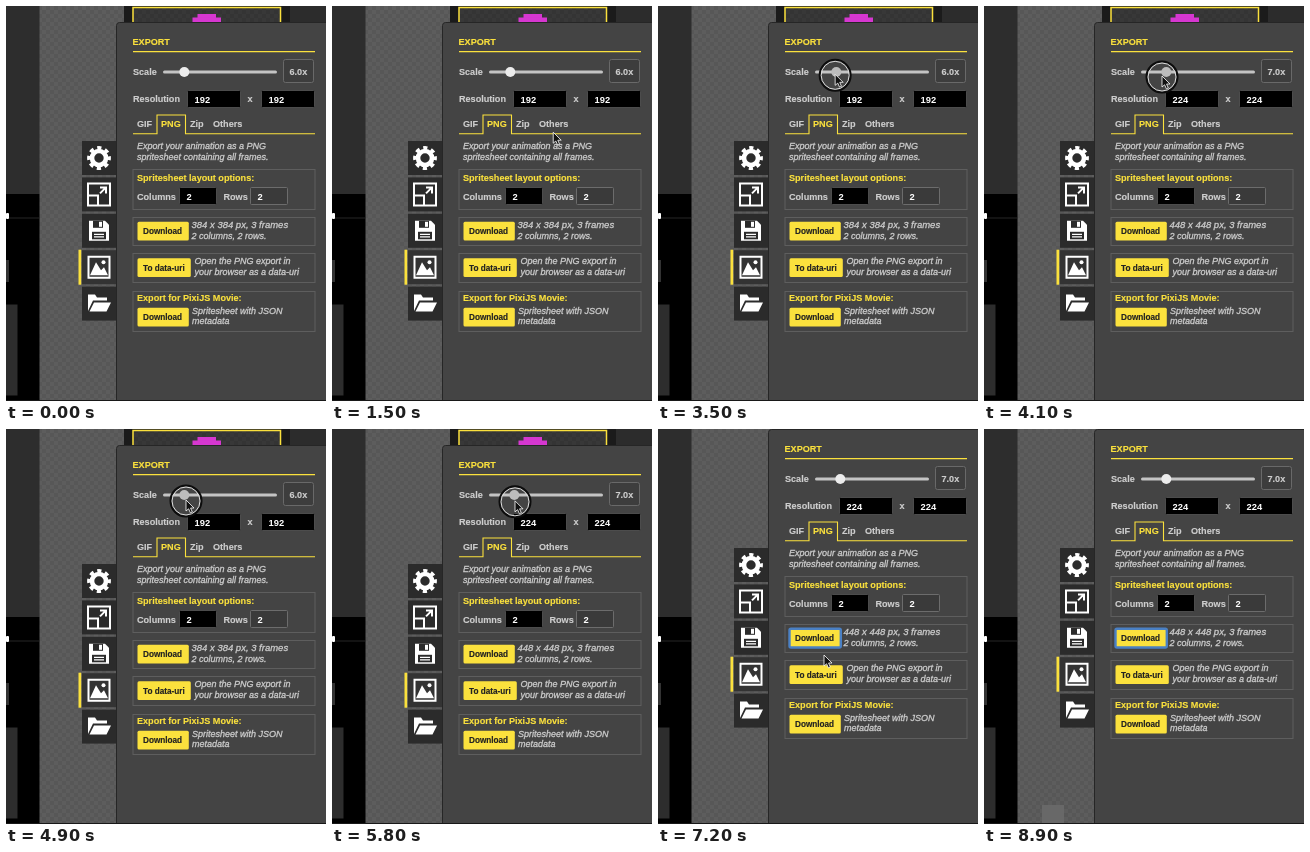
These frames come from a looping animation (320x395 px, 9400 ms). An HTML page:

```html
<!DOCTYPE html>
<html lang="en">
<head>
<meta charset="utf-8">
<title>Export panel</title>
<style>
  html, body { margin: 0; width: 100%; height: 100%; overflow: hidden; background: #444; }
  svg { display: block; width: 100vw; height: 100vh; }
  text {
    font: bold 9.1px "Liberation Sans", Arial, sans-serif; white-space: pre;
    fill: #cecece; stroke: #cecece; stroke-width: .15px;
  }
  .title { fill: #fbe13d; stroke: #fbe13d; }
  .note { font-weight: normal; font-style: italic; font-size: 9px; stroke-width: .3px; }
  .size { font-size: 9.5px; }
  .label { font-size: 8.2px; fill: #222; stroke: #222; }
  .value { font-size: 9.4px; fill: #fff; stroke: none; }
  .tip { font-weight: normal; font-size: 8.4px; fill: #fff; stroke: #fff; }
</style>
</head>
<body>
<svg id="stage" viewBox="0 0 320 395" preserveAspectRatio="none"></svg>
<script>
const LOOP = 9400, STEP = 100, YELLOW = '#fbe13d';
const stage = document.getElementById('stage');

// Pointer path: time, x, y
const path = [
  [100, 296, 350], [900, 262, 190], [1100, 250, 165], [2000, 181, 72], [2300, 177, 68],
  [3300, 177, 68], [4100, 178, 70], [4900, 180, 71], [5100, 180, 71], [5500, 183, 71],
  [5900, 183, 72], [6400, 166, 226], [7900, 166, 226], [8800, 70, 400]
];

const rect = (x, y, w, h, fill, extra = '') =>
  `<rect x="${x}" y="${y}" width="${w}" height="${h}" fill="${fill}" ${extra}/>`;
const line = (d, stroke, width = 1) =>
  `<path d="${d}" fill="none" stroke="${stroke}" stroke-width="${width}"/>`;
const shape = (d, fill) => `<path d="${d}" fill="${fill}"/>`;
const text = (x, y, s, cls = '') => `<text x="${x}" y="${y}" class="${cls}">${s}</text>`;
const group = (x, y, s) => `<g transform="translate(${x} ${y})">${s}</g>`;
const frame = (y, h) => rect(127, y + .5, 182, h, 'none', 'stroke="#5e5e5e"');
const input = (x, y, w, value, fill = '#000', border = '#4c4c4c') =>
  rect(x + .5, y + .5, w, 17, fill, `stroke="${border}" rx="1"`) + text(x + 7.5, y + 12.5, value, 'value');
const button = (y, w, label, fill = YELLOW, extra = '') =>
  rect(131.5, y + .7, w - .7, 18.8, fill, 'rx="1.5" ' + extra) + text(137, y + 13, label, 'label');

const icons = [
  '<g fill="none" stroke="#fff"><circle r="7" stroke-width="4.6"/>' +
    '<circle r="10.2" stroke-width="3.4" stroke-dasharray="4.2 3.81" stroke-dashoffset="2.1"/></g>',
  line('M-11 -11H11V11H-11ZM-11 1H-1V11M1 -1L7 -7M1 -7H7V-1', '#fff', 2),
  shape('M-10 -10H6L10 -6V10H-10Z', '#fff') + rect(-6, -10, 10, 7, '#2b2b2b') +
    rect(0, -9, 3, 5, '#fff') + rect(-7, 1, 14, 7.5, '#2b2b2b') + line('M-5 3.5H5M-5 6H5', '#fff', 1.3),
  line('M-10.5 -10.5H10.5V10.5H-10.5Z', '#fff', 2) + shape('M-9 8L-3 -5 2 3 5 0 9 8Z', '#fff') +
    '<circle cx="4.5" cy="-5" r="2" fill="#fff"/>',
  shape('M-11 7.5V-9H-4L-2 -6H8V-3H-6L-11 7.5Z', '#fff') + shape('M-9.5 8L-5 -1H12L7.5 8Z', '#fff')
];

const backdrop =
  `<defs><pattern id="check" width="8" height="8" patternUnits="userSpaceOnUse">
    ${rect(0, 0, 8, 8, '#5d5d5d') + rect(0, 0, 4, 4, '#575757') + rect(4, 4, 4, 4, '#575757')}
  </pattern></defs>` +
  rect(0, 0, 320, 395, 'url(#check)') +
  rect(0, 0, 33.5, 188, '#2d2d2d') + rect(0, 188, 33.5, 207, '#000') + rect(0, 211.5, 33, 1, '#262626') +
  rect(0, 207, 3, 6, '#fff', 'rx="1"') + rect(0, 254, 3, 22, '#333') + rect(0, 298.5, 11.5, 91, '#2d2d2d') +
  rect(118, 0, 202, 20, '#2c2c2c') + rect(118, 0, 166, 20, '#1b1b1b') +
  rect(127, 1.5, 147.5, 30, 'url(#check)') +
  rect(127, 1.5, 147.5, 30, '#0006', `stroke="${YELLOW}" stroke-width="1.5"`) +
  rect(191.5, 8, 18.5, 4, '#d637d0') + rect(186.5, 11.5, 28.5, 6, '#d637d0');

function sidebar() {
  return icons.map((icon, i) => {
    const on = i === 3;
    const tab = rect(-17, -17, 34.5, 34, on ? '#333' : '#2b2b2b');
    return group(93, 152 + i * 36.4, tab + (on ? rect(-20.5, -17.5, 2.7, 35, YELLOW) : '') + icon);
  }).join('');
}

function panel(s) {
  const size = s.scale * 32, sheet = s.scale * 64;
  const knob = s.dragging ? '#bcbcbc' : s.hover ? '#fff' : '#ececec';
  return rect(110.5, 16.5, 220, 420, '#444', 'rx="3" stroke="#262626"') +
    text(126.5, 39, 'EXPORT', 'title') + line('M127 45.7H309', YELLOW, 1.2) +
    text(127, 68.5, 'Scale') + rect(157, 64.5, 114, 3, '#c4c4c4', 'rx="1.5"') +
    `<circle cx="${s.scale * 4 + 154.3}" cy="66" r="5" fill="${knob}"/>` +
    rect(277.5, 53.5, 30, 23, '#3d3d3d', 'rx="2" stroke="#696969"') + text(283.5, 69, s.scale + '.0x') +
    text(127, 96, 'Resolution') + input(181, 84, 53, size) + text(241.5, 96, 'x') + input(255, 84, 53, size) +
    text(131, 121, 'GIF') + text(155, 121, 'PNG', 'title') + text(184, 121, 'Zip') + text(207, 121, 'Others') +
    line('M127 127.8H151V109H179.5V127.8H309', YELLOW, 1.1) +
    text(131, 143, 'Export your animation as a PNG', 'note') +
    text(131, 153.5, 'spritesheet containing all frames.', 'note') +
    frame(163, 40) + text(131, 175, 'Spritesheet layout options:', 'title') +
    text(131, 193.5, 'Columns') + input(173, 181, 37, 2) +
    text(217.5, 193.5, 'Rows') + input(244, 181, 37, 2, '#3a3a3a', '#6c6c6c') +
    frame(211, 28) +
    button(215, 52, 'Download', s.pressing ? '#fff' : YELLOW,
      s.focus ? 'stroke="#4a80c4" stroke-width="2.4"' : '') +
    text(185.5, 222, `${sheet} x ${sheet} px, 3 frames`, 'note size') +
    text(185.5, 232.5, '2 columns, 2 rows.', 'note') +
    frame(247, 29) + button(251.5, 54, 'To data-uri') +
    text(188.5, 258, 'Open the PNG export in', 'note') + text(188.5, 268.5, 'your browser as a data-uri', 'note') +
    frame(285, 40) + text(131, 295, 'Export for PixiJS Movie:', 'title') + button(301, 52, 'Download') +
    text(186, 307.8, 'Spritesheet with JSON', 'note') + text(186, 317.8, 'metadata', 'note');
}

const tooltip = rect(156, 28, 123, 20, '#000', 'rx="4"') + shape('M213 48H222L217.5 52Z', '#000') +
  text(163, 41, 'Scale the animation for export', 'tip');

const arrow = '<path d="M0 0V11L2.6 8.8 4.4 12.8 6.3 12 4.6 8H8Z" fill="#111" stroke="#fff" stroke-width=".8"/>';
const hand = '<path d="M-1 1Q0 -1 1.2 1V5L6 6.2Q7.6 7 7 9L5.6 13H-.6L-4 8.4Q-4 6.6 -1 8Z" ' +
  'fill="#fff" stroke="#111" stroke-width=".9"/>';
const ring = '<g fill="none"><circle cy="1" r="15.5" stroke="#0c0c0c" stroke-width="2"/>' +
  '<circle cy="1" r="14" stroke="#ddd"/></g>';

function pointer(t) {
  const i = path.findIndex(p => p[0] > t);
  if (i < 1) return null;
  const [t0, x0, y0] = path[i - 1], [t1, x1, y1] = path[i];
  const k = (t - t0) / (t1 - t0), e = k * k * (3 - 2 * k);
  return [x0 + (x1 - x0) * e, y0 + (y1 - y0) * e];
}

function draw(t) {
  const within = (a, b) => t >= a && t < b;
  const s = {
    scale: within(3700, 4600) || t >= 5400 ? 7 : 6,
    hover: within(2100, 6000),
    dragging: within(3400, 5900),
    pressing: within(6400, 7100),
    focus: t >= 6800
  };
  const at = pointer(t);
  const clicking = s.dragging || within(6700, 6900);
  stage.innerHTML = backdrop +
    group(0, t >= 7100 ? -16 : 0, sidebar() + panel(s)) +
    (within(2200, 3300) ? tooltip : '') +
    (t >= 8700 ? rect(58, 376, 22, 18, '#686868') : '') +
    rect(0, 394, 320, 1, '#181818') +
    (at ? group(...at, (clicking ? ring : '') + (s.pressing ? hand : arrow)) : '');
}

let shown = -1;
function tick() {
  const t = Math.floor(performance.now() % LOOP / STEP) * STEP;
  if (t !== shown) draw(shown = t);
  requestAnimationFrame(tick);
}
tick();
</script>
</body>
</html>
```
